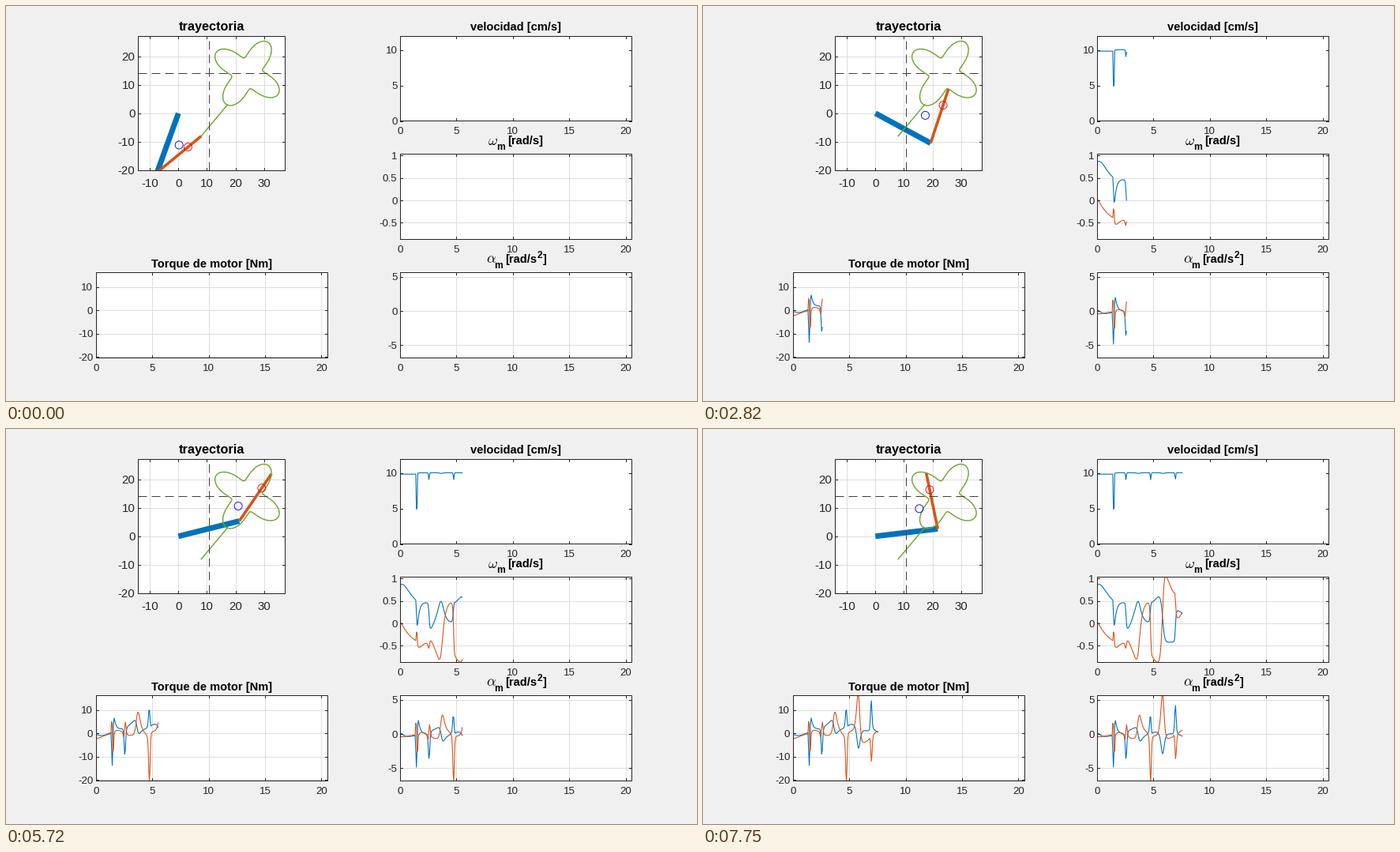
Write a matplotlib script that moves like this. It is 875 by 500 pixels and loops after 8 s.

```python
import numpy as np
import matplotlib.pyplot as plt
from matplotlib.animation import FuncAnimation
from matplotlib.patches import Circle, Rectangle

plt.rcParams["font.family"] = "Liberation Sans"
plt.rcParams["mathtext.fontset"] = "cm"

W, H = 875, 500
PT = 0.72                     # points per pixel at 100 dpi
INTERVAL, FRAMES = 40, 200
BLUE, ORANGE, GREEN = "#0072BD", "#D95319", "#6CA62B"
INK, GRID = "#262626", "#dedede"

fig = plt.figure(figsize=(W / 100, H / 100), dpi=100, facecolor="#f0f0f0")
ax = fig.add_axes([0, 0, 1, 1])
ax.set_xlim(0, W)
ax.set_ylim(H, 0)
ax.axis("off")


def label(x, y, text, size, ha="center", weight="normal", color=INK):
    ax.text(x, y, text, fontsize=size * PT, ha=ha, va="baseline",
            weight=weight, color=color, zorder=8)


def segment(x, y, color, width=1, **kw):
    return ax.plot(x, y, color=color, lw=width * PT, **kw)[0]


class Panel:
    """A boxed chart placed in pixels, with linear data scales."""

    def __init__(self, box, origin, scale, xticks, yticks, size, xbase, grid=True):
        self.origin, self.scale = origin, scale
        left, top, right, bottom = box
        self.frame = Rectangle((left, top), right - left, bottom - top,
                               fc="white", ec="none", zorder=0)
        ax.add_patch(self.frame)
        ax.add_patch(Rectangle((left, top), right - left, bottom - top,
                               fc="none", ec=INK, lw=PT, zorder=7))
        for value in xticks:
            x, _ = self.px(value, 0)
            if grid:
                segment([x, x], [top, bottom], GRID, zorder=1)
            for edge, step in ((top, 3), (bottom, -3)):
                segment([x, x], [edge, edge + step], INK, zorder=7)
            label(x, xbase, f"{value:g}", size)
        for value in yticks:
            _, y = self.px(0, value)
            if grid:
                segment([left, right], [y, y], GRID, zorder=1)
            for edge, step in ((left, 3), (right, -3)):
                segment([edge, edge + step], [y, y], INK, zorder=7)
            label(left - 3.5, y + size * 0.36, f"{value:g}", size, ha="right")

    def px(self, x, y):
        return (self.origin[0] + self.scale[0] * np.asarray(x),
                self.origin[1] - self.scale[1] * np.asarray(y))

    def line(self, color, width, x=(), y=(), **kw):
        art = segment(*self.px(x, y), color, width, **kw)
        art.set_clip_path(self.frame)
        return art

    def circle(self, color):
        art = Circle((0, 0), 5, fc="none", ec=color, lw=0.9 * PT, zorder=6)
        ax.add_patch(art)
        art.set_clip_path(self.frame)
        return art


# Tool path: a straight approach, then a four-petal flower
L1, L2 = 22, 20
START, CENTER = np.array([8, -8]), np.array([24.1, 14])
PETAL, ENTRY = np.radians(56), np.radians(237.8)
STEPS_PER_BEAT, APPROACH, QUARTER = 5, 25, 2.19
STEP = 0.29 / STEPS_PER_BEAT

angle = ENTRY + np.linspace(0, 2 * np.pi, 8001)
radius = 9.3 + 3.8 * np.cos(4 * (angle - PETAL))
flower = CENTER[:, None] + radius * np.array([np.cos(angle), np.sin(angle)])
arc = np.append(0, np.cumsum(np.hypot(*np.diff(flower))))

count = np.arange(155)
time = count * STEP
part = np.minimum(count / APPROACH, 1)
travel = np.maximum(count - APPROACH - 1, 0) * STEP * arc[-1] / (4 * QUARTER)
tip = np.array([
    np.where(count <= APPROACH, START[k] + part * (flower[k, 0] - START[k]),
             np.interp(travel, arc, flower[k])) for k in range(2)])

# Inverse kinematics and derivatives
reach = np.hypot(*tip)
q1 = np.unwrap(np.arctan2(tip[1], tip[0])) - np.arccos(
    (L1**2 + reach**2 - L2**2) / (2 * L1 * reach))
q2 = np.pi - np.arccos((L1**2 + L2**2 - reach**2) / (2 * L1 * L2))
elbow = L1 * np.array([np.cos(q1), np.sin(q1)])
mass2 = elbow + 0.7 * (tip - elbow)
mass = 0.219 * elbow + 0.558 * mass2


def rate(values):
    return np.gradient(values, STEP)


speed = np.hypot(rate(tip[0]), rate(tip[1]))
w1, w2 = rate(q1), rate(q2)
a1, a2 = rate(w1), rate(w2)
torque1 = 3 * a1 + 0.22 * mass[0] + 1.5 * w1 - 2.4
torque2 = 3 * a2 + 0.05 * mass[0] - 2 * w2 - 1.1

# Panels
SECONDS, XSCALE = range(0, 21, 5), 14.28
arm = Panel((167, 37.5, 353, 208), (218.3, 135.8), (3.6125, 3.6125),
            range(-10, 31, 10), range(-20, 21, 10), 15, 229)
vel = Panel((499, 37.5, 792, 145.4), (499, 145.5), (XSCALE, 8.99),
            SECONDS, (0, 5, 10), 13.33, 162, grid=False)
omega = Panel((499, 187.4, 792, 295.2), (499, 246), (XSCALE, 56.6),
              SECONDS, (-0.5, 0, 0.5, 1), 13.33, 312)
alpha = Panel((499, 337.2, 792, 445), (499, 386), (XSCALE, 8.67),
              SECONDS, (-5, 0, 5), 13.33, 462)
motor = Panel((113.8, 337.2, 406.6, 445), (113.8, 385), (XSCALE, 2.95),
              SECONDS, (-20, -10, 0, 10), 13.33, 462)


def title(x, y, text, size=14.67, ha="center"):
    label(x, y, text, size, ha, "bold", "black")


title(260, 31, "trayectoria", 16.2)
title(645.5, 31, "velocidad [cm/s]")
title(261, 331, "Torque de motor [Nm]")
label(610.5, 175.5, r"$\omega$", 18, "left", color="black")
title(621, 182, "m", 12, "left")
title(635.5, 175.5, "[rad/s]", ha="left")
label(607.5, 325.5, r"$\alpha$", 18, "left", color="black")
title(618, 332, "m", 12, "left")
title(632.5, 325.5, "[rad/s", ha="left")
title(673, 319, "2", 12, "left")
title(680, 325.5, "]", ha="left")

# Arm artists; the path and the dashed guides lie over the links
link1 = arm.line(BLUE, 7, zorder=2, solid_capstyle="butt")
link2 = arm.line(ORANGE, 3.6, zorder=3, solid_capstyle="butt")
arm.line(GREEN, 1.4, np.append(START[0], flower[0]),
         np.append(START[1], flower[1]), zorder=4)
for ends in (([-14.1, 37.4], [14, 14]), ([10.7, 10.7], [-20, 27.2])):
    arm.line("#404040", 1, *ends, zorder=5, dashes=(11, 6))
dot, dot2 = arm.circle("blue"), arm.circle("red")

traces = [(panel, panel.line(color, 1.1, zorder=3), data)
          for panel, color, data in (
              (vel, BLUE, speed),
              (omega, BLUE, w1), (omega, ORANGE, w2),
              (alpha, BLUE, a1), (alpha, ORANGE, a2),
              (motor, BLUE, torque1), (motor, ORANGE, torque2))]


def update(i):
    now = i * INTERVAL + INTERVAL - 1
    beat = 0 if now < 500 else (now - 500) // 290 + 1
    k = STEPS_PER_BEAT * beat
    link1.set_data(*arm.px([0, elbow[0, k]], [0, elbow[1, k]]))
    link2.set_data(*arm.px([elbow[0, k], tip[0, k]], [elbow[1, k], tip[1, k]]))
    dot.center = arm.px(*mass[:, k])
    dot2.center = arm.px(*mass2[:, k])
    shown = slice(0, k + 1 if k else 0)
    for panel, art, data in traces:
        art.set_data(*panel.px(time[shown], data[shown]))
    return [link1, link2, dot, dot2] + [art for _, art, _ in traces]


anim = FuncAnimation(fig, update, frames=FRAMES, interval=INTERVAL,
                     repeat=True, repeat_delay=0)
plt.show()
```
